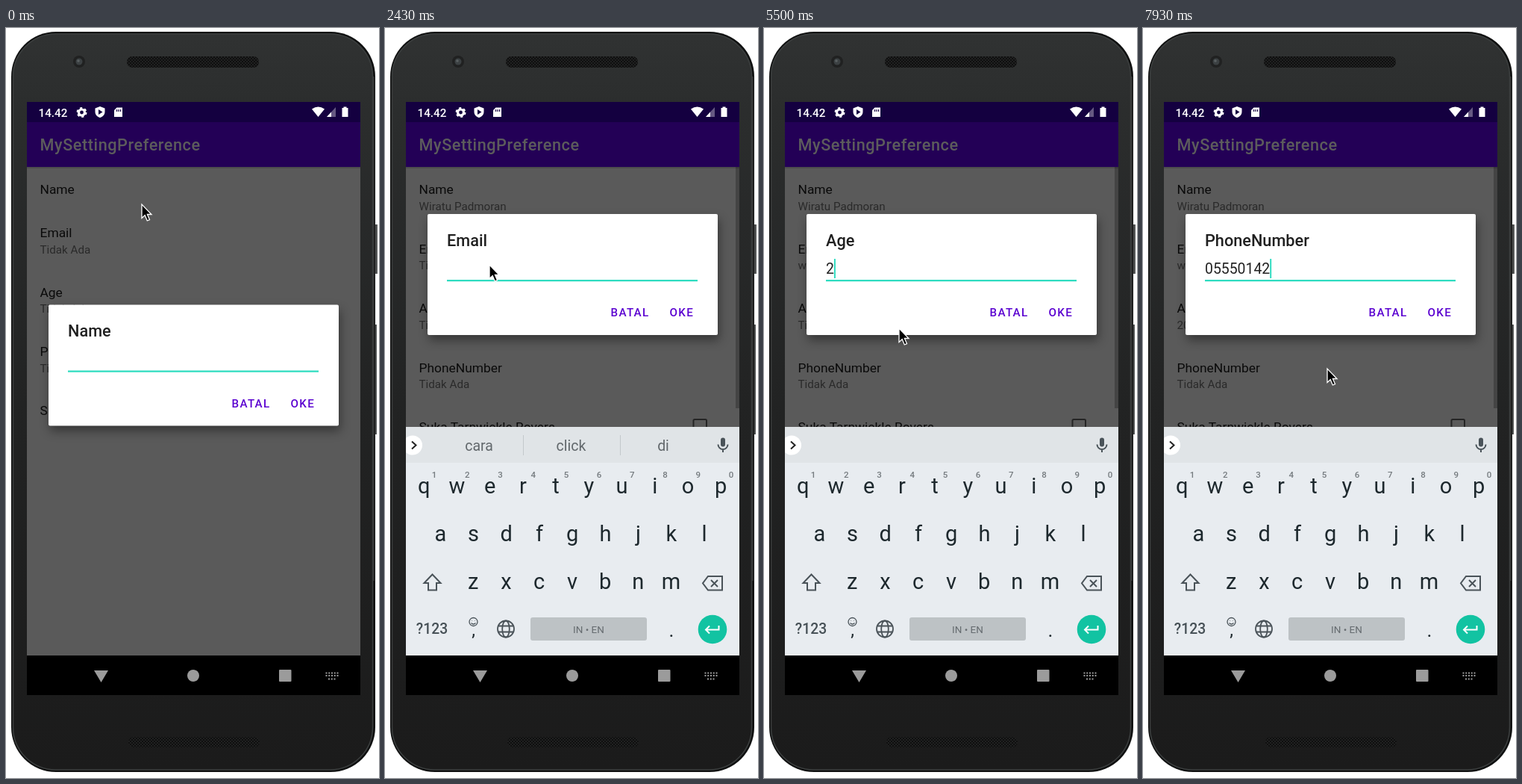
An HTML page that plays this animation: 500 by 1004 pixels, repeating every 8 s.

```html
<!DOCTYPE html>
<html lang="id">
<head>
<meta charset="utf-8">
<title>MySettingPreference</title>
<style>
  html, body { margin: 0; width: 100%; height: 100%; overflow: hidden; background: #fff; }
  svg { display: block; width: 100vw; height: 100vh; }
  text { font-family: Roboto, "Noto Sans", sans-serif; white-space: pre; }
  .medium { font-weight: 500; }
  .mid { text-anchor: middle; }
  .row { font-size: 17.4px; fill: #1c1c1c; }
  .summary { font-size: 15.2px; fill: #737373; }
  .input { font-size: 19.4px; fill: #222; }
  .composing { text-decoration: underline; text-decoration-thickness: 1px; }
  .button { font-size: 15.2px; font-weight: 500; letter-spacing: 1.3px; fill: #5a00d0; }
  .suggestion { font-size: 19.5px; fill: #62686c; }
  .key { font-size: 29px; fill: #1d282d; }
  .hint { font-size: 11.5px; fill: #747a7e; font-weight: 500; }
  .line { fill: none; stroke: #4a5359; stroke-width: 2; }
  #dialog { filter: drop-shadow(2px 7px 7px rgba(0, 0, 0, .4)); }
</style>
</head>
<body>
<svg viewBox="0 0 500 1004" preserveAspectRatio="none">
  <defs>
    <linearGradient id="shell" x2="0" y2="1">
      <stop offset="0" stop-color="#303232"/>
      <stop offset=".1" stop-color="#2b2d2d"/>
      <stop offset=".5" stop-color="#222323"/>
      <stop offset="1" stop-color="#1b1b1b"/>
    </linearGradient>
    <pattern id="grille" width="4" height="4" patternUnits="userSpaceOnUse">
      <rect width="4" height="4" fill="#202121"/>
      <circle cx="1" cy="1" r="1" fill="#090909"/>
      <circle cx="3" cy="3" r="1" fill="#090909"/>
    </pattern>
    <clipPath id="screen"><path d="M28 99H475V893H28Z"/></clipPath>
  </defs>

  <!-- Phone shell -->
  <path d="M494 263h4v66h-4zM494 397h3v147h-3z" fill="#515353"/>
  <rect x="7" y="5" width="488" height="991" rx="60" fill="#101111"/>
  <path d="M493 65V740" stroke="#4a4c4c"/>
  <rect x="9.5" y="8" width="482" height="985" rx="57" fill="url(#shell)" stroke="#3c3f3f" stroke-width="1.5"/>
  <rect x="14" y="13" width="473" height="976" rx="53" fill="url(#shell)"/>
  <circle cx="98" cy="45" r="8" fill="#202121"/>
  <circle cx="98" cy="45" r="4.5" fill="#3b4042"/>
  <circle cx="97" cy="44" r="1.8" fill="#5a6062"/>
  <rect x="162" y="38" width="177" height="15" rx="7" fill="url(#grille)"/>
  <rect x="164" y="949" width="176" height="14" rx="7" fill="url(#grille)"/>

  <g clip-path="url(#screen)">
    <!-- App -->
    <path d="M28 99H475V840H28Z" fill="#fafafa"/>
    <g id="rows"></g>
    <path id="scrollbar" d="M470 186h5v323h-5z" fill="#000" opacity=".25"/>
    <path d="M28 186H475v2H28Z" fill="#000" opacity=".15"/>
    <path d="M28 126H475V186H28Z" fill="#6200ee"/>
    <path d="M28 99H475V126H28Z" fill="#3700b3"/>
    <text class="medium" x="45.5" y="164" font-size="21.7" letter-spacing=".55" fill="#fff">MySettingPreference</text>
    <path id="dim" d="M28 99H475V840H28Z"/>

    <!-- Status bar -->
    <g fill="#fff">
      <text class="medium" x="43.5" y="118.5" font-size="15.2">14.42</text>
      <circle cx="101.5" cy="113" r="4" fill="none" stroke="#fff" stroke-width="3.2"/>
      <circle cx="101.5" cy="113" r="6" fill="none" stroke="#fff" stroke-width="2" stroke-dasharray="3.1 3.183"/>
      <path fill-rule="evenodd" d="M126 105l6.500 2.500v4.500c0 4-2.500 6.700-6.500 8-4-1.300-6.500-4-6.500-8v-4.500zM124 109v7l5.500-3.500z"/>
      <path fill-rule="evenodd" d="M148.500 106.500H156V119H145v-9zM148 109v3h1.200v-3zM150.500 109v3h1.200v-3zM153 109v3h1.200v-3z"/>
      <path d="M410 108.500Q418.500 102.500 427 108.500L418.500 119Z"/>
      <path d="M442 106V119H430Z" opacity=".35"/>
      <path d="M436 112.500V119H430Z"/>
      <path d="M452.500 105.500h4v1.500h2V119h-8v-12h2z"/>
    </g>

    <!-- Navigation bar -->
    <path d="M28 840H475V893H28Z" fill="#000"/>

    <!-- Keyboard -->
    <g id="keyboard">
      <path d="M28 534H475V840H28Z" fill="#e8ecf0"/>
      <path d="M28 534H475V582H28Z" fill="#e0e4e7"/>
      <circle cx="37" cy="558.500" r="13" fill="#fff"/>
      <path class="line" d="M36 553.500l5.500 5-5.500 5" style="stroke:#222"/>
      <g id="suggestions">
        <text class="suggestion mid" x="126" y="566"></text>
        <text class="suggestion mid" x="249.500" y="566"></text>
        <text class="suggestion mid" x="373" y="566"></text>
        <path d="M185.500 545v27M315.500 545v27" stroke="#c3c8cb"/>
      </g>
      <rect x="450" y="548.500" width="6" height="12" rx="3" fill="#4a5359"/>
      <path class="line" d="M446.500 557.500a6.500 6.500 0 0 0 13 0M453 564v4" stroke-width="1.600"/>
      <g id="keys"></g>
      <path class="line" d="M63.500 731.500L52.500 743h5.500v9.500h11V743h5.500Z"/>
      <path class="line" d="M433 734h19v18.500h-19l-7-9.250ZM437 739l9 9M446 739l-9 9"/>
      <text class="medium mid" x="63" y="811" font-size="19.300" fill="#465056">?123</text>
      <circle class="line" cx="118.500" cy="795" r="5.500" style="stroke-width:1.300"/>
      <path class="line" d="M116.500 793v.5M120.500 793v.5M115.500 796.500q3 3 6 0" style="stroke-width:1.300"/>
      <text class="key mid" x="118.500" y="814" style="font-size:24px">,</text>
      <g class="line" style="stroke-width:1.800">
        <circle cx="162" cy="804.500" r="11"/>
        <ellipse cx="162" cy="804.500" rx="4.800" ry="11"/>
        <path d="M152 800.500h20M152 808.500h20"/>
      </g>
      <rect x="195" y="789" width="156" height="31" rx="3" fill="#bdc2c5"/>
      <text class="mid" x="273" y="809.500" font-size="13.500" fill="#666c70">IN • EN</text>
      <text class="key mid" x="384" y="815" style="font-size:26px">.</text>
      <circle cx="439" cy="805" r="19.300" fill="#12c3a2"/>
      <path class="line" d="M447.500 800v5.500H431M435 800.500l-5 5 5 5" style="stroke:#fff"/>
    </g>

    <g fill="#9b9b9b">
      <path id="back" d="M118 860H137L127.500 876Z"/>
      <circle cx="251" cy="867" r="8"/>
      <rect x="366" y="859" width="16.500" height="16" rx="1"/>
      <path id="switcher" d="M428.500 863.500h17M428.500 867h17M432 871.500h10" fill="none" stroke="#9b9b9b" stroke-width="2" stroke-dasharray="2 1.750"/>
    </g>

    <!-- Dialog, laid out at its raised position -->
    <g id="dialog">
      <rect x="57" y="249" width="389" height="162" rx="2" fill="#fff"/>
      <text id="title" class="medium" x="83" y="291.500" font-size="21.700" fill="#202020"></text>
      <text class="input" x="83" y="329"><tspan id="done"></tspan><tspan id="word"></tspan></text>
      <path id="caret" d="M0 309h2v26h-2z" fill="#2fdcc0"/>
      <path d="M83 337h336v2.200H83z" fill="#2fdcc0"/>
      <text class="button" x="302.500" y="386">BATAL</text>
      <text class="button" x="381.500" y="386">OKE</text>
    </g>
  </g>

  <path id="pointer" d="M0 0V18.500L4.200 14.700 7.300 22 10.500 20.600 7.400 13.500H13Z" stroke="#fff" stroke-width="1.300"/>
</svg>

<script>
const LOOP = 8000;
const FADE = 150;
const KEYBOARD_TIME = 280;
const FIRST_NAME = 'Wiratu';
const UNSET = 'Tidak Ada';

// typed: [time, number of characters]
const sessions = [
  { title: 'Name', text: FIRST_NAME + ' Padmoran', open: -200, keyboard: 70, close: 1600,
    typed: [[430, 0], [1050, 15]] },
  { title: 'Email', text: 'wiratu@example.com', open: 2030, keyboard: 2150, close: 4400,
    typed: [[2680, 0], [3240, 6], [3490, 6], [3500, 7], [3630, 7], [3640, 8],
            [3700, 8], [3710, 9], [3850, 9], [4090, 18]] },
  { title: 'Age', text: '20', open: 4850, keyboard: 4970, close: 6060,
    typed: [[5420, 0], [5425, 1], [5560, 1], [5570, 2]] },
  { title: 'PhoneNumber', text: '05550142', open: 6390, keyboard: 6514, close: 9000,
    typed: [[6900, 0], [7860, 8]] },
];

// [time, x, y]
const pointerPath = [
  [1080, 182, 236], [1480, 408, 374], [1720, 408, 374], [2000, 140, 317],
  [3860, 140, 317], [4210, 311, 352], [4330, 397, 373], [4540, 397, 373],
  [4800, 181, 402], [5680, 181, 402], [5980, 397, 374], [6130, 397, 374], [6350, 247, 456],
];

const $ = id => document.getElementById(id);
const clamp = v => Math.max(0, Math.min(1, v));
const smooth = p => p * p * (3 - 2 * p);

function along(path, t, ease = p => p) {
  const next = path.findIndex(k => k[0] > t);
  if (next === 0) return path[0].slice(1);
  if (next < 0) return path[path.length - 1].slice(1);
  const a = path[next - 1], b = path[next];
  const p = ease((t - a[0]) / (b[0] - a[0]));
  return a.slice(1).map((v, i) => v + (b[i + 1] - v) * p);
}

function add(parent, tag, attrs, text = '') {
  const el = document.createElementNS('http://www.w3.org/2000/svg', tag);
  for (const name in attrs) el.setAttribute(name, attrs[name]);
  el.textContent = text;
  return parent.appendChild(el);
}

function addKeys(letters, x, y, hints = '') {
  [...letters].forEach((letter, i) => {
    const cx = x + i * 44.2;
    add($('keys'), 'text', { class: 'key mid', x: cx, y }, letter);
    if (hints) add($('keys'), 'text', { class: 'hint mid', x: cx + 13.8, y: y - 21 }, hints[i]);
  });
}
addKeys('qwertyuiop', 52.3, 623, '1234567890');
addKeys('asdfghjkl', 74.4, 687);
addKeys('zxcvbnm', 118.3, 751);

const rows = sessions.map(({ title }, i) => {
  const g = add($('rows'), 'g', {});
  add(g, 'text', { class: 'row', x: 45.5, y: 222 }, title);
  return { g, top: i * 79.5, summary: add(g, 'text', { class: 'summary', x: 45.5, y: 243.5 }) };
});
const clubRow = add($('rows'), 'g', {});
add(clubRow, 'text', { class: 'row', x: 45.5, y: 222 }, 'Suka Tarnwickle Rovers');
add(clubRow, 'rect', { x: 413.5, y: 206.5, width: 17.5, height: 17.5, rx: 1.5,
  fill: 'none', stroke: '#666', 'stroke-width': 2 });

const shift = (el, x, y) => el.setAttribute('transform', `translate(${x} ${y})`);
const show = (el, on) => { el.style.display = on ? '' : 'none'; };

function drawList(t) {
  const named = t >= sessions[0].close;
  const lift = named ? 0 : -21.5;
  rows.forEach((row, i) => {
    const saved = t >= sessions[i].close;
    row.summary.textContent = saved ? sessions[i].text : i ? UNSET : '';
    shift(row.g, 0, i ? row.top + lift : 0);
  });
  shift(clubRow, 0, 317.5 + lift);
  return named;
}

function suggest(text) {
  if (!text || text.endsWith('@')) return ['cara', 'click', 'di'];
  const word = text.split(' ').pop();
  return /^[a-z]+$/i.test(word) ? [word, word + 'i', word + 'a'] : null;
}

function drawText(session, t) {
  const text = session.text.slice(0, Math.floor(along(session.typed, t)[0] + 1e-6));
  const start = text.lastIndexOf(' ') + 1;
  const composing = /^[a-z]+$/i.test(text.slice(start));
  $('title').textContent = session.title;
  $('done').textContent = text.slice(0, start);
  $('word').textContent = text.slice(start);
  $('word').setAttribute('class', composing ? 'composing' : '');

  const first = session.typed[0][0], last = session.typed[session.typed.length - 1][0];
  const since = t < first ? t - session.keyboard + 260 : t - last;
  show($('caret'), t >= session.keyboard && (since < 0 || since % 1000 < 500));
  shift($('caret'), 83 + (text ? $('done').parentNode.getComputedTextLength() : 0), 0);

  const words = suggest(text);
  show($('suggestions'), words);
  if (words) words.forEach((w, i) => { $('suggestions').children[i].textContent = w; });
}

function render(t) {
  const named = drawList(t);
  const session = sessions.findLast(s => t >= s.open);
  const closing = clamp((t - session.close) / FADE);
  const alpha = clamp((t - session.open) / FADE) * (1 - closing);
  const rise = clamp((t - session.keyboard) / KEYBOARD_TIME);
  const left = (1 - rise) ** 2;
  const keyboardUp = rise > 0 && closing < 1;

  drawText(session, t);
  $('dim').setAttribute('opacity', .64 * alpha);
  $('dialog').setAttribute('opacity', alpha);
  shift($('dialog'), 0, 121.5 * left);

  show($('keyboard'), keyboardUp);
  $('keyboard').setAttribute('opacity', clamp(rise * 1.2) * (1 - closing));
  shift($('keyboard'), 0, 89 * left + 89 * closing ** 2);
  show($('scrollbar'), named && keyboardUp);

  const imeActive = closing < 1;
  show($('switcher'), imeActive);
  $('back').setAttribute('transform', imeActive ? '' : 'rotate(90 127.5 867)');

  shift($('pointer'), ...along(pointerPath, t, smooth));
}

const begin = performance.now();
function frame() {
  render((performance.now() - begin) % LOOP);
  requestAnimationFrame(frame);
}
frame();
</script>
</body>
</html>
```
